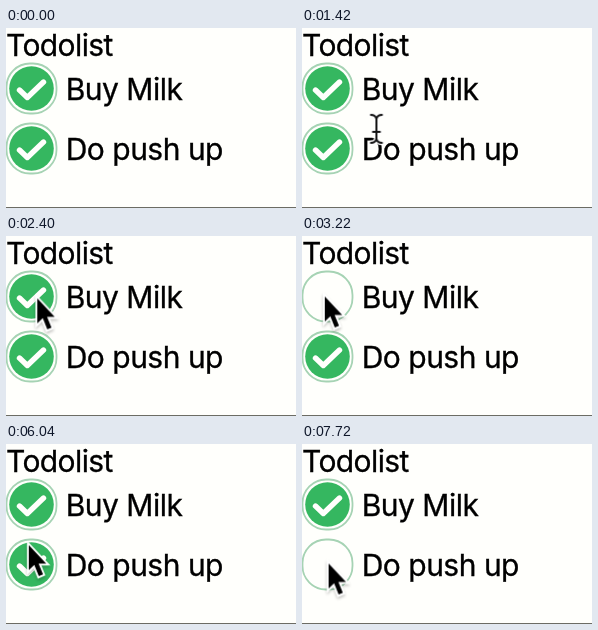
Write an HTML page that moves like this. It is 290x180 px and loops after 8000 ms.

```html
<!DOCTYPE html>
<html lang="en">
<head>
<meta charset="utf-8">
<title>Todolist</title>
<style>
html, body { margin: 0; width: 100%; height: 100%; overflow: hidden; background: #fffffc; }
svg { display: block; width: 290px; height: 180px; }
text { font: 30px Inter, "Open Sans", sans-serif; letter-spacing: -.5px; fill: #000; stroke: #000; stroke-width: .3; }
.title { letter-spacing: -.6px; }
.ring { fill: none; stroke: #a6d3b4; stroke-width: 1.8; }
.tick { fill: none; stroke: #fffffc; stroke-width: 5.4; stroke-linecap: round; stroke-linejoin: round; }

.cursor, .arrow, .beam, .first, .second { animation: 8s infinite; }
.cursor { animation-name: move; }
.arrow { animation-name: arrow; animation-timing-function: step-end; }
.beam { animation-name: beam; animation-timing-function: step-end; }
.first { animation-name: first; animation-timing-function: step-end; }
.second { animation-name: second; animation-timing-function: step-end; }

@keyframes move {
  0%, 14.25% { transform: translate(132px, 172px); animation-timing-function: linear; }
  17.75% { transform: translate(74.5px, 101px); animation-timing-function: ease-out; }
  23%, 24.5% { transform: translate(52.5px, 67px); animation-timing-function: ease-in-out; }
  33.25%, 72% { transform: translate(22.8px, 60.5px); animation-timing-function: ease-in; }
  75.5% { transform: translate(22.8px, 101px); animation-timing-function: ease-out; }
  82%, 82.25% { transform: translate(22.8px, 127px); animation-timing-function: ease-out; }
  84%, 85.75% { transform: translate(22px, 131px); animation-timing-function: ease-in-out; }
  90.75%, 100% { transform: translate(26.6px, 119.5px); }
}
@keyframes arrow {
  0% { visibility: hidden; }
  14.25% { visibility: visible; }
  15.75% { visibility: hidden; }
  20%, 100% { visibility: visible; }
}
@keyframes beam {
  0% { visibility: hidden; }
  15.75% { visibility: visible; }
  20%, 100% { visibility: hidden; }
}
@keyframes first {
  0% { visibility: visible; }
  38.75% { visibility: hidden; }
  64.5%, 100% { visibility: visible; }
}
@keyframes second {
  0% { visibility: visible; }
  96%, 100% { visibility: hidden; }
}
</style>
</head>
<body>
<svg viewBox="0 0 290 180">
  <defs>
    <rect id="ring" class="ring" x="-25" y="-25" width="50" height="50" rx="23.5"/>
    <g id="check">
      <circle r="22.3" fill="#35b760"/>
      <path class="tick" d="M-12 1.5 L-4.2 9 L12 -6.5"/>
    </g>
    <path id="bar" d="M-5.5 -14 Q-1 -14 0 -10 Q1 -14 5.5 -14 M0 -10 V10 M-5.5 14 Q-1 14 0 10 Q1 14 5.5 14 M-3.5 3 H3.5"/>
    <filter id="shadow" x="-60%" y="-40%" width="220%" height="200%">
      <feDropShadow dx="0" dy="2" stdDeviation="1.8" flood-opacity=".25"/>
    </filter>
  </defs>

  <text class="title" x="0" y="28">Todolist</text>
  <text x="59.7" y="72">Buy Milk</text>
  <text x="59.7" y="132">Do push up</text>
  <rect y="179" width="290" height="1" fill="#6c6c64"/>

  <g transform="translate(25.5 60.5)">
    <use href="#ring"/>
    <g class="first"><use href="#check"/></g>
  </g>
  <g transform="translate(25.5 120.5)">
    <use href="#ring"/>
    <g class="second"><use href="#check"/></g>
  </g>

  <g class="cursor">
    <path class="arrow" filter="url(#shadow)" fill="#000" stroke="#fff" stroke-width="3.6" paint-order="stroke"
      d="M0 0 V25 L5.5 19.8 L10 31 L14.2 29.2 L9.8 18.4 H17.4 Z"/>
    <g class="beam" fill="none" stroke-linecap="round">
      <use href="#bar" stroke="#fff" stroke-width="4.6"/>
      <use href="#bar" stroke="#111" stroke-width="2"/>
    </g>
  </g>
</svg>
</body>
</html>
```
